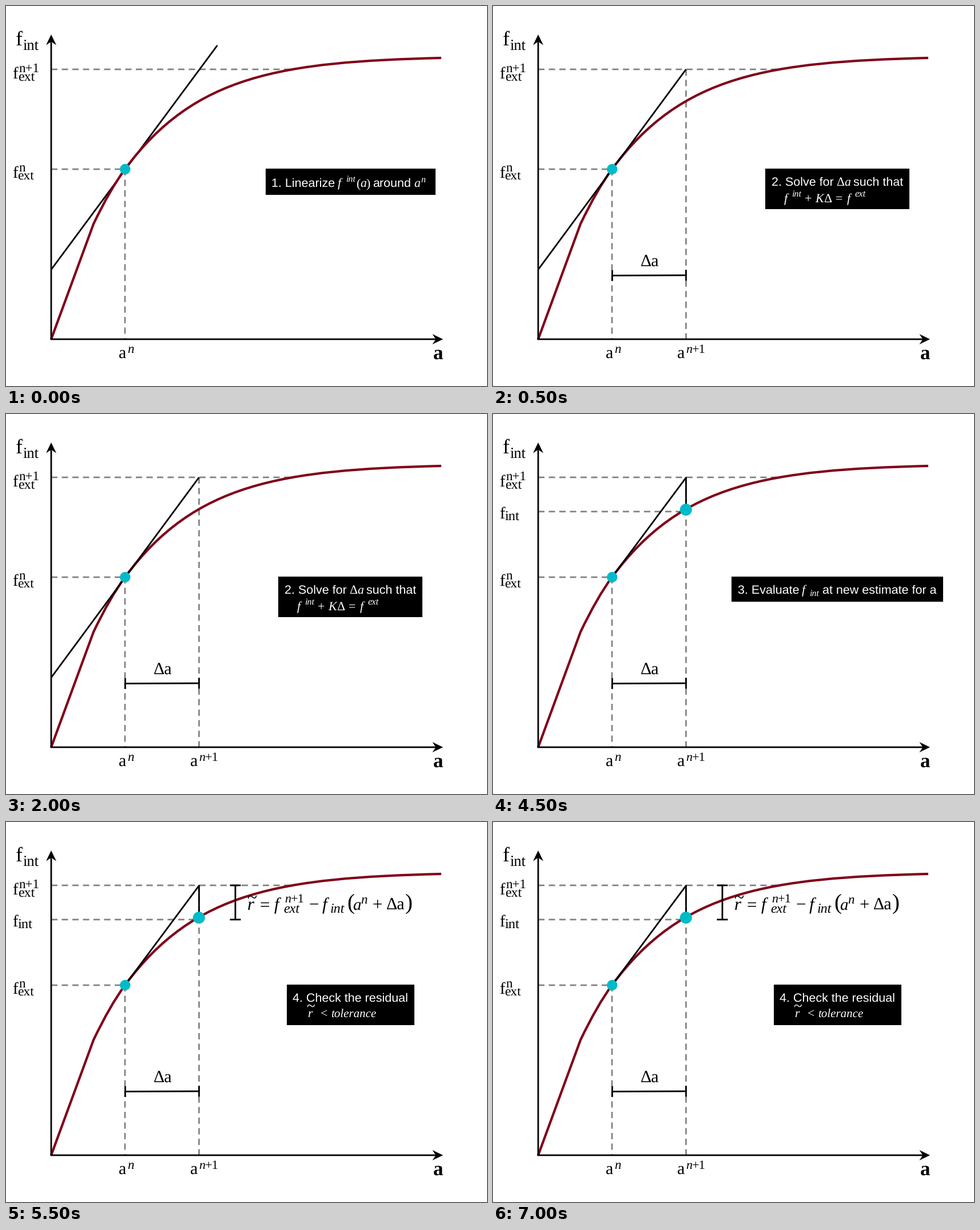
Recreate the animation shown at these times as a matplotlib script. Size 841x666 px, loop 8000 ms.

```python
import matplotlib.pyplot as plt
import numpy as np
from matplotlib.animation import FuncAnimation
from matplotlib.patches import Circle, PathPatch, Polygon, Rectangle
from matplotlib.path import Path

W, H = 841, 666
PT = 0.72  # points per pixel at 100 dpi
ALL = (0, 1, 2, 3)
STROKE = 2.8
RED, TEAL, GRAY = "#800019", "#00bbc9", "#808080"

plt.rcParams["text.hinting"] = "none"
plt.rcParams["text.hinting_factor"] = 8
plt.rcParams["lines.scale_dashes"] = False
plt.rcParams["toolbar"] = "None"

fig = plt.figure(figsize=(W / 100, H / 100), dpi=100, facecolor="white")
ax = fig.add_axes([0, 0, 1, 1])
ax.set_xlim(0, W)
ax.set_ylim(H, 0)
ax.axis("off")

parts = []  # (artist, stages in which it shows)


def keep(artist, stages):
    parts.append((artist, stages))
    return artist


def line(xs, ys, stages=ALL, color="black", width=STROKE, z=4, **kw):
    kw.setdefault("solid_capstyle", "butt")
    keep(ax.plot(xs, ys, color=color, lw=width * PT, zorder=z, snap=False,
                 **kw)[0], stages)


def dashed(xs, ys, stages=ALL):
    line(xs, ys, stages, GRAY, 2.7, 1, dashes=(11 * PT, 7.5 * PT),
         dash_capstyle="butt")


def dot(x, y, r, stages=ALL):
    keep(ax.add_patch(Circle((x, y), r, fc=TEAL, ec="none", zorder=6)), stages)


def text(x, y, s, size, stages=ALL, color="black", font="Liberation Serif",
         style="normal", weight="normal"):
    keep(ax.text(x, y, s, fontsize=size * PT, color=color, family=font,
                 style=style, weight=weight, ha="left", va="baseline",
                 zorder=9), stages)


def italic(x, y, s, size, stages=ALL, color="black"):
    text(x, y, s, size, stages, color, style="italic")


def box(x0, y0, x1, y1, stage):
    keep(ax.add_patch(Rectangle((x0, y0), x1 - x0, y1 - y0,
                                fc="black", ec="none", zorder=8)), (stage,))


def sans(x, y, s, stage):
    text(x, y, s, 21.5, (stage,), "white", "Liberation Sans")


def note(x, y, s, stage, size=22):
    text(x, y, s, size, (stage,), "white")


def note_it(x, y, s, stage, size=22):
    italic(x, y, s, size, (stage,), "white")


def bracket(x0, y0, x1, y1, stages):
    """Measuring bar with end ticks square to it."""
    line([x0, x1], [y0, y1], stages)
    wide = abs(x1 - x0) > abs(y1 - y0)
    dx, dy = (0, 9.5) if wide else (9.5, 0)
    for x, y in ((x0, y0), (x1, y1)):
        line([x - dx, x + dx], [y - dy, y + dy], stages)


# Axes with swept arrowheads
line([79, 79], [585, 58], z=5)
line([77.6, 757], [584, 584], z=5)
head = np.array([(0, 0), (-18.5, -9), (-12.5, 0), (-18.5, 9)])
for pts in (head + (764, 584), head[:, ::-1] * (1, -1) + (79, 50)):
    ax.add_patch(Polygon(pts, fc="black", ec="none", zorder=5))

# Material curve: elastic branch, then smooth hardening
curve = Path([(79, 584), (153, 382), (181.8, 321.5), (208, 286),
              (330, 120.4), (481, 98), (761, 91)],
             [Path.MOVETO, Path.LINETO] + [Path.CURVE3] * 2
             + [Path.CURVE4] * 3)
ax.add_patch(PathPatch(curve, fc="none", ec=RED, lw=4.2 * PT, zorder=3,
                       capstyle="butt"))

# Guides
dashed([79, 497], [111, 111])
dashed([79, 208], [286, 286])
dashed([208, 208], [286, 584])
dashed([337.5, 337.5], [111, 584], (1, 2, 3))
dashed([79, 337], [171, 171], (2, 3))

# Tangent in its three lengths, and the drop to the curve
line([79, 369.5], [462, 69], (0,), z=2)
line([79, 337.5], [462, 111], (1,))
line([208, 337.5, 337.5], [286, 111.5, 167], (2, 3), solid_joinstyle="round")

dot(208.3, 286, 9.2)
dot(337.3, 167.7, 10.5, (2, 3))
bracket(208.5, 472.4, 337.5, 471.9, (1, 2, 3))
bracket(401, 111, 401, 171, (3,))

# Axis labels
text(17, 69, "f", 36)
text(29, 78, "int", 26.5)
text(11, 127, "f", 29)
text(22, 116, "n+1", 23)
text(21, 131, "ext", 24)
text(11, 301, "f", 29)
text(22, 290, "n", 23)
text(20, 305, "ext", 23.5)
text(11, 183, "f", 29, (2, 3))
text(20, 187, "int", 24.5, (2, 3))
text(197, 617, "a", 30)
italic(212, 608, "n", 23)
text(322, 617, "a", 30, (1, 2, 3))
italic(337, 608, "n", 22, (1, 2, 3))
text(348, 608, "+1", 22.5, (1, 2, 3))
text(747, 619, "a", 35, weight="bold")
text(258, 457, "Δa", 30, (1, 2, 3))

# Step 1
box(454, 285, 751, 331, 0)
sans(464, 317, "1. Linearize", 0)
note_it(580, 317, "f", 0)
note_it(594, 308, "int", 0, 16)
note(612, 317, "(", 0)
note_it(619, 317, "a", 0)
note(629, 317, ")", 0)
sans(641, 317, "around", 0)
note_it(713, 317, "a", 0)
note_it(725, 309, "n", 0, 16)

# Step 2
box(476, 285, 728, 356, 1)
sans(487, 315, "2. Solve for", 1)
note(600, 315, "Δ", 1)
note_it(614, 315, "a", 1)
sans(630, 315, "such that", 1)
note_it(509, 344, "f", 1)
note_it(522, 334, "int", 1, 16)
note(545, 344, "+", 1)
note_it(563, 344, "K", 1)
note(578, 344, "Δ", 1)
note(599, 344, "=", 1)
note_it(619, 344, "f", 1)
note_it(632, 334, "ext", 1, 16.5)

# Step 3
box(417, 285, 787, 329, 2)
sans(428, 315, "3. Evaluate", 2)
note_it(540, 315, "f", 2)
note_it(553, 319, "int", 2, 16)
sans(576, 315, "at new estimate for a", 2)

# Step 4
box(491, 285, 714, 356, 3)
sans(501, 315, "4. Check the residual", 3)
note_it(527, 342, "r", 3)
note(525, 331, "~", 3, 27)
note(550, 342, "<", 3)
note_it(568, 342, "tolerance", 3, 21)

# Residual equation
END = (3,)
italic(422, 154, "r", 31, END)
text(421, 142, "~", 32, END)
text(443, 154, "=", 31, END)
italic(469, 154, "f", 31, END)
italic(487, 141, "n", 22, END)
text(498, 141, "+1", 22.5, END)
italic(485, 159, "ext", 24, END)
text(529, 154, "−", 31, END)
italic(553, 154, "f", 31, END)
italic(567, 160, "int", 24, END)
text(596, 153, "(", 39, END)
italic(606, 154, "a", 29, END)
italic(620, 143, "n", 23, END)
text(640, 154, "+", 31, END)
text(665, 154, "Δa", 30, END)
text(698, 153, ")", 39, END)


def update(frame):
    stage = (frame + 4) // 5
    for artist, stages in parts:
        artist.set_visible(stage in stages)
    return [artist for artist, _ in parts]


anim = FuncAnimation(fig, update, frames=16, interval=500, repeat=True,
                     repeat_delay=0, blit=False)
plt.show()
```
